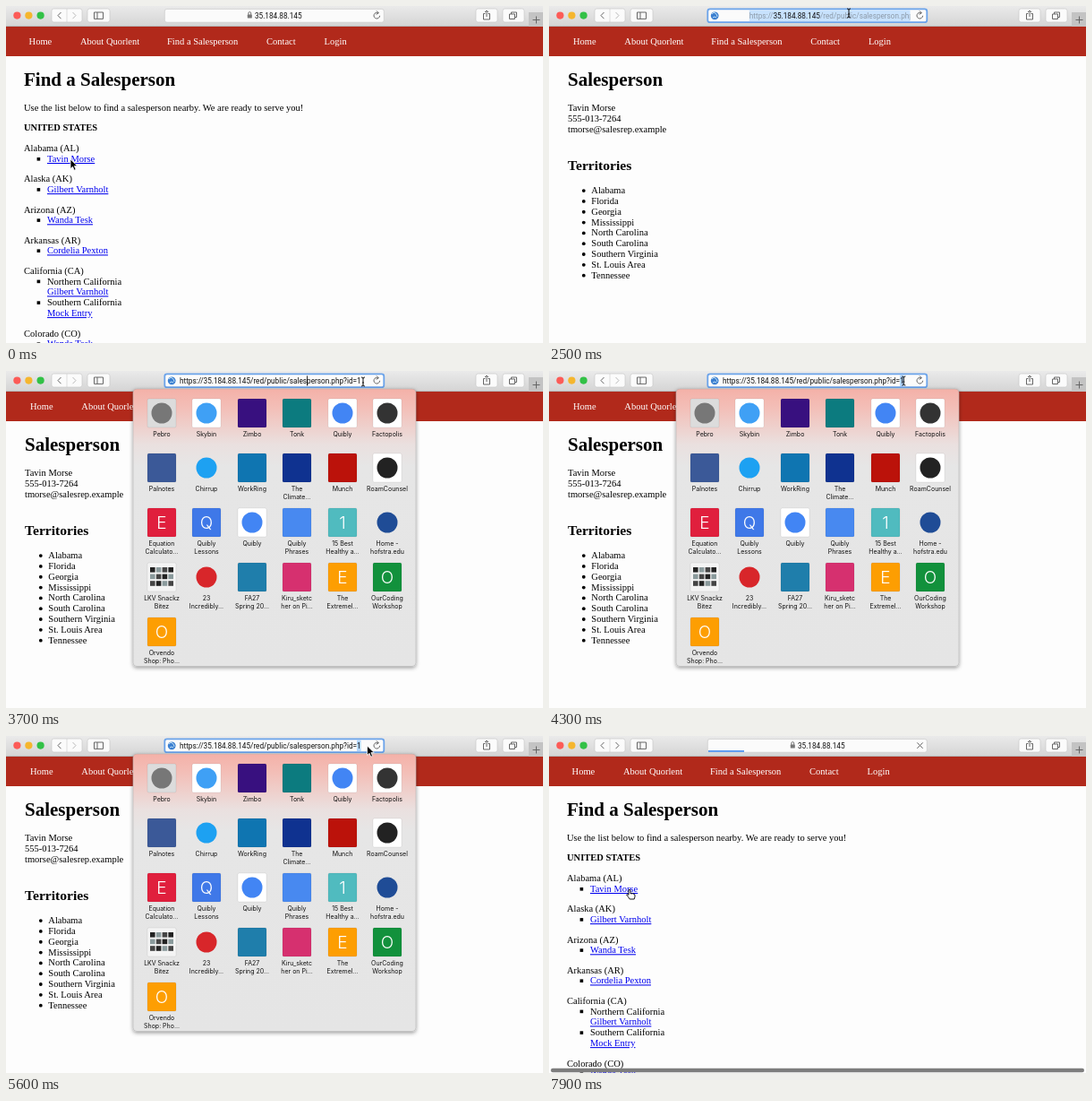
Recreate the animation shown at these times as an HTML page. Size 600 by 376 pixels, loop 8000 ms.

```html
<!DOCTYPE html>
<html lang="en">
<head>
<meta charset="utf-8">
<title>Find a Salesperson</title>
<style>
  html, body { margin: 0; width: 600px; height: 376px; overflow: hidden; background: #fdfdfd; }
  svg { display: block; }
  text { font: 10.5px "Liberation Serif", "Times New Roman", serif; }
  .h1 { font-size: 21px; font-weight: bold; }
  .h2 { font-size: 15.6px; font-weight: bold; }
  .bold { font-weight: bold; }
  .nav { fill: #fff; }
  .link { fill: #00e; text-decoration: underline; }
  .url { font: 8.2px Roboto, sans-serif; fill: #111; }
  .label { font: 7px Inter, sans-serif; fill: #111; text-anchor: middle; }
  .letter { font: 300 19px Inter, sans-serif; fill: #fff; text-anchor: middle; }
  .line { fill: none; stroke: #666; stroke-width: 1; }
  .button { fill: #fbfbfb; stroke: #c4c4c4; stroke-width: .6; }
</style>
</head>
<body>
<svg id="stage" width="600" height="376" viewBox="0 0 600 376"></svg>
<script>
const LOOP = 8000;
const text = (x, y, s, cls = '') => `<text x="${x}" y="${y}" class="${cls}">${s}</text>`;
const rect = (x, y, w, h, fill, r = 0, more = '') =>
  `<rect x="${x}" y="${y}" width="${w}" height="${h}" fill="${fill}" rx="${r}" ${more}/>`;
const circle = (x, y, r, fill) => `<circle cx="${x}" cy="${y}" r="${r}" fill="${fill}"/>`;
const line = (d, more = '') => `<path class="line" d="${d}" ${more}/>`;
const group = (id, body) => `<g id="${id}">${body}</g>`;
const button = (x, w) => `<rect class="button" x="${x}" y="3" width="${w}" height="15" rx="2.5"/>`;

function nav(dx) {
  const items = [[25.6, 'Home'], [83, 'About Quorlent'], [180, 'Find a Salesperson'],
    [291, 'Contact'], [355.6, 'Login']];
  return rect(0, 23, 600, 33, '#b1291b') +
    items.map(([x, s]) => text(x + dx, 43.2, s, 'nav')).join('');
}

function listPage() {
  const square = y => rect(34.6, y - 5, 3.6, 3.6, '#000');
  const entry = (y, state, name) =>
    text(20, y, state) + square(y + 11.8) + text(46, y + 11.8, name, 'link');
  const area = (y, place, name) => square(y) + text(46, y, place) + text(46, y + 11.8, name, 'link');
  return nav(0) + text(20, 89, 'Find a Salesperson', 'h1') +
    text(20, 117.4, 'Use the list below to find a salesperson nearby. We are ready to serve you!') +
    text(20, 139.4, 'UNITED STATES', 'bold') +
    entry(162.2, 'Alabama (AL)', 'Tavin Morse') +
    entry(196.3, 'Alaska (AK)', 'Gilbert Varnholt') +
    entry(230.5, 'Arizona (AZ)', 'Wanda Tesk') +
    entry(264.6, 'Arkansas (AR)', 'Cordelia Pexton') +
    text(20, 298.8, 'California (CA)') +
    area(310.6, 'Northern California', 'Gilbert Varnholt') +
    area(334.3, 'Southern California', 'Mock Entry') +
    entry(368.6, 'Colorado (CO)', 'Wanda Tesk');
}

function personPage() {
  const places = ['Alabama', 'Florida', 'Georgia', 'Mississippi', 'North Carolina',
    'South Carolina', 'Southern Virginia', 'St. Louis Area', 'Tennessee'];
  return nav(1.3) + text(21, 89, 'Salesperson', 'h1') +
    ['Tavin Morse', '555-013-7264', 'tmorse@salesrep.example']
      .map((s, i) => text(21, 117.4 + 11.8 * i, s)).join('') +
    text(21, 183, 'Territories', 'h2') +
    places.map((s, i) => {
      const y = 209.1 + 11.82 * i;
      return circle(38.8, y - 3, 1.9, '#000') + text(47.3, y, s);
    }).join('');
}

// Each tile: background, mark colour, letter, label lines
const tiles = [
  ['#dcdcdc', '#777', '', 'Pebro'], ['#fff', '#3fa0f5', '', 'Skybin'],
  ['#38107f', '', '', 'Zimbo'], ['#0c7b7f', '', '', 'Tonk'],
  ['#fff', '#4285f4', '', 'Quibly'], ['#fff', '#333', '', 'Factopolis'],
  ['#3b5998', '', '', 'Palnotes'], ['', '#1da1f2', '', 'Chirrup'],
  ['#0f75b1', '', '', 'WorkRing'], ['#0f3290', '', '', 'The', 'Climate...'],
  ['#bb120a', '', '', 'Munch'], ['#fff', '#222', '', 'RoamCounsel'],
  ['#e01f3d', '', 'E', 'Equation', 'Calculato...'], ['#3f78e8', '', 'Q', 'Quibly', 'Lessons'],
  ['#fff', '#4285f4', '', 'Quibly'], ['#4889f0', '', '', 'Quibly', 'Phrases'],
  ['#50bbbf', '', '1', '15 Best', 'Healthy a...'], ['', '#1f4c96', '', 'Home -', 'hofstra.edu'],
  ['#f4f4f4', 'grid', '', 'LKV Snackz', 'Bitez'], ['', '#d8262a', '', '23', 'Incredibly...'],
  ['#1f7eab', '', '', 'FA27', 'Spring 20...'], ['#d6306f', '', '', 'Kiru_sketc', 'her on Pi...'],
  ['#fd9e02', '', 'E', 'The', 'Extremel...'], ['#12913c', '', 'O', 'OurCoding', 'Workshop'],
  ['#fd9e02', '', 'O', 'Orvendo', 'Shop: Pho...']
];

function tile([back, mark, letter, ...labels], i) {
  const x = Math.round(173.8 + 50.45 * (i % 6)), y = 31 + 61 * Math.floor(i / 6);
  let out = back ? rect(x - 16, y, 32, 32, back, 1.5, 'stroke="#0002" stroke-width=".5"') : '';
  if (mark === 'grid') {
    for (let k = 0; k < 12; k++)
      out += rect(x - 13 + 6.8 * (k % 4), y + 5 + 7.6 * Math.floor(k / 4), 5.6, 5.6,
        ['#222', '#8a9a9c', '#444'][k % 3]);
  } else if (mark) out += circle(x, y + 16, 11.5, mark);
  return out + (letter && text(x, y + 23, letter, 'letter')) +
    labels.map((s, k) => text(x, y + 41.8 + 9.3 * k, s, 'label')).join('');
}

const toolbar = rect(0, 0, 600, 23, 'url(#bar)') + rect(0, 22.3, 600, .7, '#aaa') +
  circle(12.4, 10.6, 4.1, '#fc5b57') + circle(25.4, 10.6, 4.1, '#f5b62e') +
  circle(38.6, 10.6, 4.1, '#32c146') +
  button(51, 34) + line('M68 3v15', 'style="stroke:#ccc;stroke-width:.6"') +
  line('M61.5 7l-3.5 3.6 3.5 3.6') + line('M74.5 7l3.5 3.6-3.5 3.6', 'id="forward"') +
  button(91, 25) + line('M98.5 7h10v7.4h-10zM102 7v7.4') +
  button(525, 24) + line('M535.5 8.5h-2v6.5h7v-6.5h-2M537 12V5M535 7l2-2 2 2', 'stroke-width=".8"') +
  button(555, 24) + line('M562.5 9h6v5.5h-6zM564.5 9V7h6v5.5h-2') +
  rect(584, 7, 16, 16, '#c3c3c3') + line('M588.5 15.5h8M592.5 11.5v8') +
  `<rect class="button" id="field" x="177.3" y="3.4" width="245" height="14.800" rx="2.5"/>` +
  group('idle', rect(269.8, 9.6, 5, 4, '#777', .6) +
    line('M270.9 10V8a1.4 1.4 0 0 1 2.8 0v2', 'style="stroke:#777"') +
    text(278, 13.6, '35.184.88.145', 'url')) +
  group('progress', rect(178, 16.2, 40, 1.5, '#2f80ee')) +
  group('stop', line('M411.3 7.4l6.4 6.4M417.7 7.4l-6.4 6.4')) +
  group('reload', line('M417.6 10.8a3.3 3.3 0 1 1-1.6-2.9M414 5.4l2.4 2.4-2.8 1.5', 'stroke-width=".8"')) +
  group('editing', circle(185.2, 10.8, 4.4, '#3b7fd0') +
    line('M182 9q2-3 4-1t2 4M183 13q2-2 4 0', 'style="stroke:#bfe0f5"') +
    `<g clip-path="url(#fieldClip)"><g id="entry">` +
    rect(0, 4.5, 0, 12.6, '#b3d7fe', 0, 'id="selection"') +
    `<text id="address" class="url" x="0" y="13.6"><tspan class="dim">https://</tspan>` +
    `<tspan>35.184.88.145</tspan><tspan class="dim">/red/public/salesperson.php?id=1</tspan></text>` +
    rect(0, 5.4, .9, 11, '#111', 0, 'id="caret"') + `</g></g>`);

const pointers =
  group('arrow', '<path d="M0 0v10.6l2.5-2.3 1.7 3.9 1.9-.8-1.7-3.8h3.4z" fill="#000" stroke="#fff" stroke-width=".8"/>') +
  group('hand', '<path d="M-1 .8q1-1.4 2 0v4q3-.6 4.8 1 .8 2-.6 5.2h-5q-2-3-3.6-5 .5-1.4 2.4.3z" fill="#fff" stroke="#000" stroke-width=".9"/>') +
  group('beam', line('M-2-5q2 0 2 1.3q0-1.3 2-1.3M0-4v8M-2 5q2 0 2-1.3q0 1.3 2 1.3M-1 1h2', 'style="stroke:#111"'));

const stage = document.getElementById('stage');
stage.innerHTML = `<defs>
  <linearGradient id="bar" x2="0" y2="1"><stop stop-color="#eaeaea"/><stop offset="1" stop-color="#d4d4d4"/></linearGradient>
  <linearGradient id="glass" x2="0" y2="1"><stop stop-color="#f4b1a8"/><stop offset=".07" stop-color="#f3bfb8"/>
    <stop offset=".2" stop-color="#eae0df"/><stop offset=".28" stop-color="#e6e6e6"/><stop offset="1" stop-color="#e5e5e5"/></linearGradient>
  <filter id="shadow"><feDropShadow dx="0" dy="1.5" stdDeviation="2" flood-opacity=".4"/></filter>
  <clipPath id="fieldClip"><rect x="190" y="3" width="213.5" height="15"/></clipPath></defs>` +
  group('list', listPage()) + group('person', personPage()) +
  group('scrollbar', rect(2, 370.8, 596, 4.4, '#7d7d7d', 2.2)) + toolbar +
  group('popup', rect(142, 20, 316, 309.5, 'url(#glass)', 4, 'filter="url(#shadow)" stroke="#aaa" stroke-width=".5"') +
    tiles.map(tile).join('')) + pointers;

const $ = id => document.getElementById(id);
const show = (id, on) => { $(id).style.display = on ? '' : 'none'; };
const set = (id, attrs) => { for (const k in attrs) $(id).setAttribute(k, attrs[k]); };
const ease = p => p * p * (3 - 2 * p);
const easeOut = p => 1 - (1 - p) ** 2;
const offset = n => $('address').getSubStringLength(0, n);

// Pointer path: time, x, y
const path = [[0, 72, 171], [900, 74, 172], [1300, 75, 173], [1900, 333, 10], [2500, 335, 8],
  [2900, 338, 9], [3300, 336, 10], [3700, 399, 12], [4200, 396, 11], [5000, 403.5, 11],
  [5800, 403.5, 11], [6450, 65, 11], [6900, 65, 11], [7600, 90, 171], [LOOP, 90, 171]];

function pointerAt(t) {
  const i = path.findIndex(k => k[0] > t);
  const [t0, x0, y0] = path[i - 1], [t1, x1, y1] = path[i];
  const p = ease((t - t0) / (t1 - t0));
  return [x0 + (x1 - x0) * p, y0 + (y1 - y0) * p];
}

function draw(t) {
  const listed = t < 1300 || t >= 7300;
  const loading = t >= 1000 && t < 1300 || t >= 7800;
  const editing = t >= 2400 && t < 5800;
  show('list', listed);
  show('person', !listed);
  show('scrollbar', t >= 7500);
  show('popup', t >= 2700 && t < 5800);
  show('progress', loading);
  show('stop', loading);
  show('reload', !loading);
  show('idle', !editing);
  show('editing', editing);
  $('forward').style.stroke = t >= 7300 ? '#666' : '#bbb';
  $('field').style.cssText = editing ? 'stroke:#6ba3ea;stroke-width:1.8' : '';

  if (editing) {
    const slide = Math.min(1, (t - 2400) / 250);
    set('entry', { transform: `translate(${278 - 84 * easeOut(slide)} 0)` });
    const all = t < 3300, last = t >= 4200;
    const start = last ? offset(52) : 0;
    set('selection', { x: start, width: all || last ? offset(53) - start : 0, opacity: .5 + slide / 2 });
    set('caret', { x: offset(38) });
    show('caret', !all && !last);
    for (const part of document.querySelectorAll('.dim')) part.style.fill = slide < 1 ? '#8c9aa8' : '';
  }

  const [x, y] = pointerAt(t);
  const hand = t >= 300 && t < 1300 || t >= 7600;
  const beam = !hand && y < 18 && x > 190 && x < 402;
  for (const [id, on] of [['arrow', !hand && !beam], ['hand', hand], ['beam', beam]]) {
    show(id, on);
    set(id, { transform: `translate(${x} ${y})` });
  }
}

function frame(now) {
  draw(now % LOOP);
  requestAnimationFrame(frame);
}
frame(0);
</script>
</body>
</html>
```
